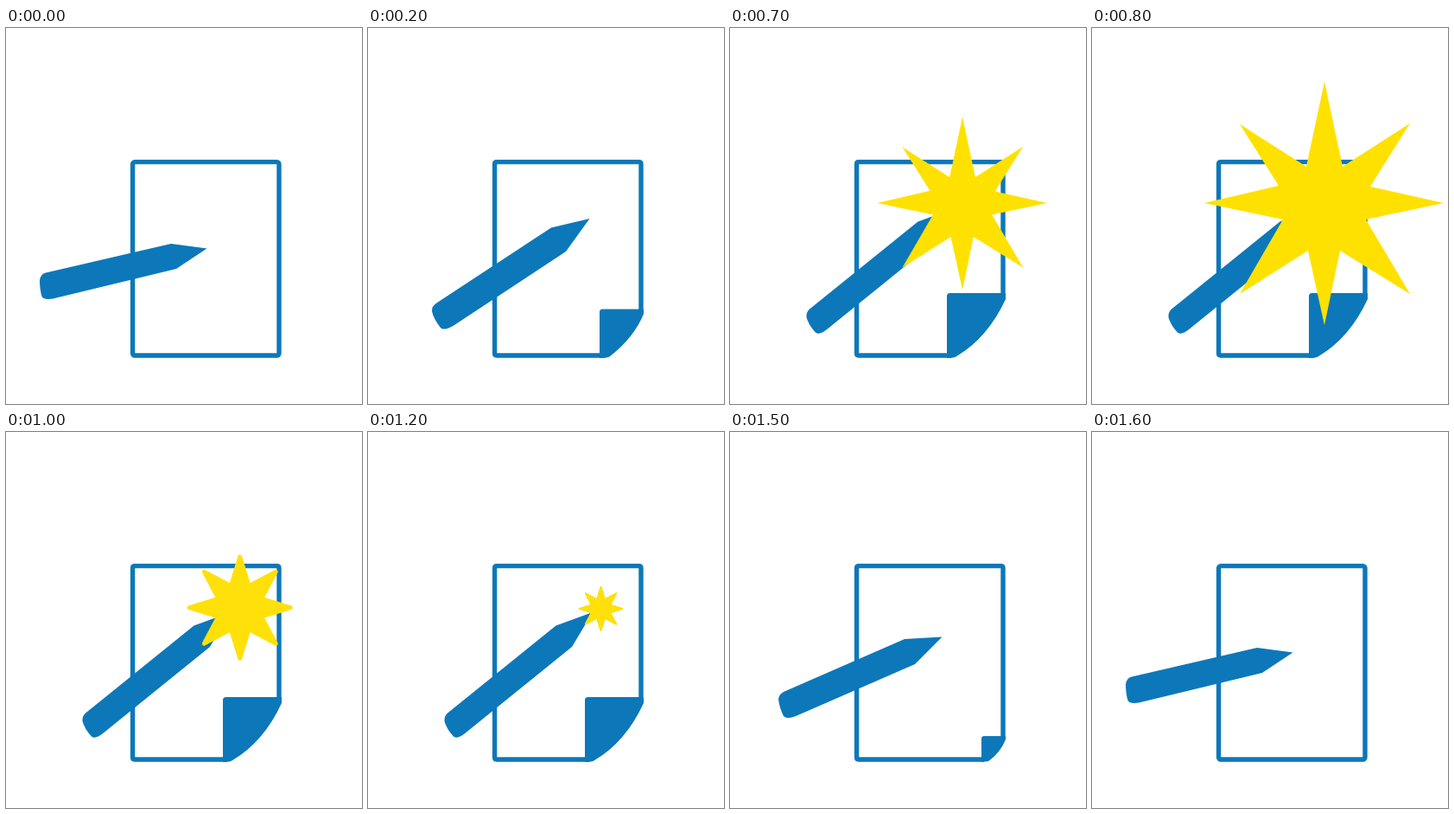
An HTML page without scripts that plays this animation: 412 px wide and 434 px high, repeating every 1.7 s.

```html
<!DOCTYPE html>
<html lang="en">
<head>
<meta charset="utf-8">
<title>Pencil and star</title>
<style>
  html, body { margin: 0; width: 100%; height: 100%; overflow: hidden; background: #fff; }
  svg { display: block; width: 100%; height: 100%; }

  .pose { fill: #0c78b9; opacity: 0; }
  .page { fill: none; stroke: #0c78b9; stroke-width: 5.4; }
  .spark { fill: #ffe009; stroke: #ffe009; stroke-width: 8; stroke-linejoin: round; }
  .burst { fill: #ffe100; }

  /* 17 beats of 100 ms, every change is a cut */
  .pose, .spark, .burst { animation: 1.7s step-end infinite; }
  .flat { animation-name: flat; }
  .lift { animation-name: lift; }
  .tilt { animation-name: tilt; }
  .up { animation-name: up; }
  .spark { animation-name: spark; }
  .burst { animation-name: burst; }

  @keyframes flat {
    0%, 94.11% { opacity: 1; }
    5.88% { opacity: 0; }
    100% { opacity: 1; }
  }
  @keyframes lift {
    0%, 11.76%, 94.11%, 100% { opacity: 0; }
    5.88%, 88.23% { opacity: 1; }
  }
  @keyframes tilt {
    0%, 17.64%, 88.23%, 100% { opacity: 0; }
    11.76%, 76.47% { opacity: 1; }
  }
  @keyframes up {
    0%, 76.47%, 100% { opacity: 0; }
    17.64% { opacity: 1; }
  }
  @keyframes spark {
    0%, 41.17%, 76.47%, 100% { transform: scale(0); }
    23.52%, 70.58% { transform: translate(269.5px, 204px) scale(.26); }
    29.41%, 64.7% { transform: translate(269.5px, 204px) scale(.385); }
    35.29%, 58.82% { transform: translate(270.7px, 202.7px) scale(.61); }
  }
  @keyframes burst {
    0%, 58.82%, 100% { transform: scale(0); }
    41.17%, 52.94% { transform: translate(269px, 202px) scale(.71); }
    47.05% { transform: translate(269px, 202px) scale(1); }
  }
</style>
</head>
<body>
<svg viewBox="0 0 412 434">
  <g class="pose flat">
    <rect class="page" x="146.6" y="154.6" width="169.4" height="223.4" rx="2.5"/>
    <path d="M191 249L232.500 254.500L197 278L54 312.500Q44 314 41.500 310Q39 302 39 291Q40 284 46 282.500Z"/>
  </g>

  <g class="pose lift">
    <path class="page" d="M294 378H149Q146.600 378 146.600 375.500V157Q146.600 154.600 149 154.600H313.500Q316 154.600 316 157V353"/>
    <path d="M294 351H319V355Q313 370 299 380L291 381V354Q291 351 294 351Z"/>
    <path d="M202 239L245.500 236.500L214 268L76 328Q66 332 62 328Q57 318 56 308Q57 302 63 299.500Z"/>
  </g>

  <g class="pose tilt">
    <path class="page" d="M272 378H149Q146.600 378 146.600 375.500V157Q146.600 154.600 149 154.600H313.500Q316 154.600 316 157V328"/>
    <path d="M271 324.500H319V330Q308 357 280 379Q277 381 268 381V328Q268 324.500 271 324.500Z"/>
    <path d="M212 230.500L256.500 220L229 258L99 343.500Q88 350 84 346Q76 336 74 327Q73.500 321 80 317Z"/>
  </g>

  <g class="pose up">
    <path class="page" d="M256 378H149Q146.600 378 146.600 375.500V157Q146.600 154.600 149 154.600H313.500Q316 154.600 316 157V310"/>
    <path d="M254.500 306H319V313Q298 358 262 379Q259 381 251 381V309.500Q251 306 254.500 306Z"/>
    <path d="M217.500 223.500L260 208L236 248L112 348Q103 355 99 351.500Q91 343 88.500 334Q88 328 92 324.500Z"/>
  </g>

  <polygon class="spark" points="0,-96 17,-41 68,-68 41,-17 96,0 41,17 68,68 17,41 0,96 -17,41 -68,68 -41,17 -96,0 -41,-17 -68,-68 -17,-41"/>
  <polygon class="burst" points="0,-140 21,-42 99,-92 53,-19 138,0 48,19 99,105 18,55 0,141 -19,55 -98,105 -48,19 -139,0 -53,-20 -98,-91 -21,-42"/>
</svg>
</body>
</html>
```
